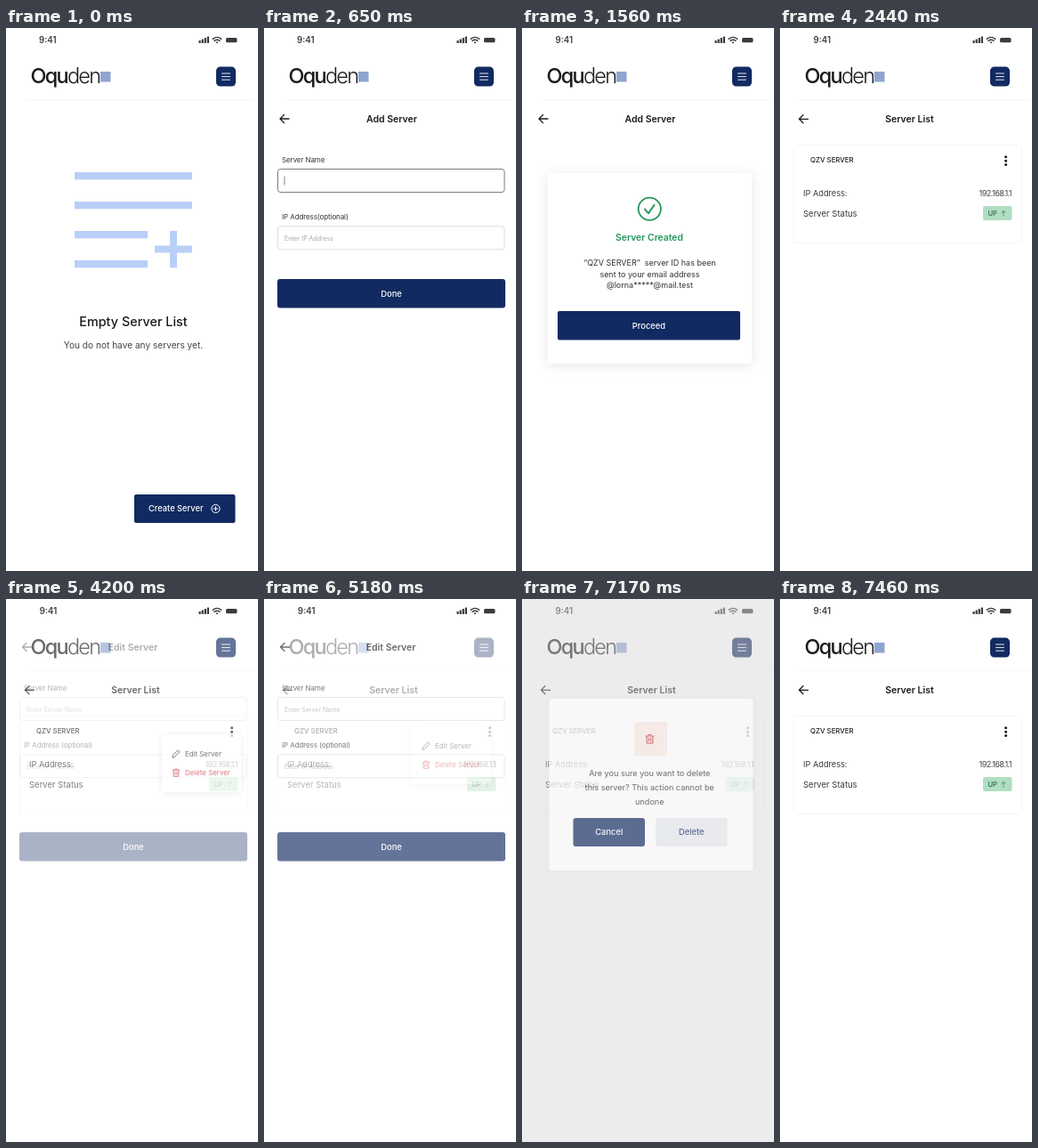
Write an HTML page that moves like this. It is 283x610 px and loops after 8000 ms.

```html
<!DOCTYPE html>
<html lang="en">
<head>
<meta charset="utf-8">
<title>Server list prototype</title>
<style>
  html, body { margin: 0; width: 100%; height: 100%; overflow: hidden; background: #fff; }
  svg { display: block; width: 283px; height: 610px; font-family: Inter, "Open Sans", sans-serif; }
  text { white-space: pre; }
</style>
</head>
<body>
<svg id="stage" viewBox="0 0 283 610"></svg>
<script>
const LOOP = 8000;
const NAVY = '#112a61', INK = '#1b1b1d', SOFT = '#3a3a3e', GREEN = '#22985a', RED = '#c8323c';

// y is the middle of the capitals
const text = (x, y, str, size, { fill = INK, weight = 400, anchor = 'start', gap = 0 } = {}) =>
  `<text x="${x}" y="${y + size * 0.364}" font-size="${size}" fill="${fill}" font-weight="${weight}" text-anchor="${anchor}" letter-spacing="${gap}">${str}</text>`;
const mid = (x, y, str, size, opts) => text(x, y, str, size, { anchor: 'middle', ...opts });
const rect = (x, y, w, h, fill, r = 0, extra = '') =>
  `<rect x="${x}" y="${y}" width="${w}" height="${h}" rx="${r}" fill="${fill}" ${extra}/>`;
const line = (d, stroke = INK, width = 1) =>
  `<path d="${d}" fill="none" stroke="${stroke}" stroke-width="${width}" stroke-linecap="round" stroke-linejoin="round"/>`;
const circle = (x, y, r, attrs) => `<circle cx="${x}" cy="${y}" r="${r}" ${attrs}/>`;
const shadow = (blur, alpha, dy = 0) => `style="filter:drop-shadow(0 ${dy}px ${blur}px rgba(0,0,0,${alpha}))"`;

const button = (x, y, w, h, label, fill = NAVY, color = '#fff', r = 3) =>
  rect(x, y, w, h, fill, r) + mid(x + w / 2, y + h / 2, label, 9.4, { fill: color, weight: 500 });
const back = (x, y) => line(`M${x + 10} ${y}H${x}m4.5 -4.5L${x} ${y}l4.5 4.5`, INK, 1.3);
const trash = (x, y, s) =>
  `<g transform="translate(${x} ${y}) scale(${s})">${line('M-4 -3H4M-1.5 -4.4H1.5M-3 -3V4.3H3V-3M-1 -0.8V2.2M1 -0.8V2.2', RED, 1)}</g>`;

function statusBar(x) {
  const bars = [3, 4.5, 6, 7.5].map((h, i) => rect(216.5 + i * 3.1, 17 - h, 2.2, h, '#3c3c3c', 0.5)).join('');
  const wifi = line('M232.2 12.4Q237 8.4 241.8 12.4M234 14.4Q237 12 240 14.4', '#3c3c3c', 1.4) +
    circle(237, 16.2, 1, 'fill="#3c3c3c"');
  return text(x, 13.5, '9:41', 9.7, { fill: '#3c3c3c', weight: 600 }) + bars + wifi +
    rect(247, 11, 12.5, 5.2, '#3c3c3c', 1.5);
}

function header(x = 37.5) {
  const brand = `<text x="27.5" y="61.5" font-size="23.5" fill="${INK}" letter-spacing="-1.75"><tspan font-weight="500">Oqu</tspan><tspan font-weight="300">den</tspan></text>`;
  return rect(0, 0, 283, 610, '#fff') + statusBar(x) + brand +
    rect(106, 49, 11.5, 11.5, '#8fa5cf') +
    rect(236, 43.6, 22, 22, NAVY, 4.5) +
    line('M242.5 51h9M242.5 54.6h9M242.5 58.2h9', '#fff', 0.9) +
    rect(22, 80, 258, 1, '#f6f6f7');
}

const title = (x, y, str) => mid(x, y, str, 10.5, { weight: 600 });

const field = (y, label, hint, border) =>
  text(20, y, label, 8, { fill: '#333', gap: -0.1 }) +
  rect(15.5, y + 10.5, 254.5, 26, '#fff', 3, `stroke="${border}" stroke-width="1"`) +
  text(23, y + 24, hint, 7, { fill: '#a9a9ad' });

const empty = header(37) +
  [[162, 132], [195, 132], [228, 82], [261, 82]].map(([y, w]) => rect(77, y, w, 8.3, '#b9cff7')).join('') +
  rect(167, 244.5, 42, 8, '#b9cff7') + rect(184, 228, 8, 41.3, '#b9cff7') +
  mid(143, 330, 'Empty Server List', 14.4, { weight: 500 }) +
  mid(143, 356, 'You do not have any servers yet.', 10.15, { fill: '#444' }) +
  rect(144, 524, 113.5, 32, NAVY, 2) +
  text(160, 540, 'Create Server', 9.3, { fill: '#fff', weight: 500 }) +
  circle(235.5, 540, 4.6, 'fill="none" stroke="#fff"') + line('M233.2 540h4.6M235.5 537.7v4.6', '#fff');

const add = header(37) + back(18, 102) + title(143.5, 102, 'Add Server') +
  field(148, 'Server Name', '', '#7b7b7f') + line('M23 167v9', '#666', 0.8) +
  field(212.3, 'IP Address(optional)', 'Enter IP Address', '#dcdce0') +
  button(15, 282, 256, 32.5, 'Done');

const created = header() + back(19, 102) + title(144, 102, 'Add Server') +
  rect(29, 163, 229, 214, '#fff', 2, shadow(7, 0.1, 2)) +
  circle(143.3, 203.2, 12.6, `fill="none" stroke="${GREEN}" stroke-width="1.8"`) +
  line('M138 203.6l4 4.6 6.6 -9.4', GREEN, 2) +
  mid(143, 235, 'Server Created', 10.4, { fill: GREEN, weight: 600 }) +
  ['“QZV SERVER”  server ID has been', 'sent to your email address', '@lorna*****@mail.test']
    .map((s, i) => mid(143.5, 264 + i * 12.6, s, 9, { fill: '#333' })).join('') +
  button(40, 318, 205, 32.5, 'Proceed', NAVY, '#fff', 2);

const list = header() + back(21.5, 102.3) + title(145.5, 102.3, 'Server List') +
  rect(15.5, 131.5, 256, 110, '#fff', 2, 'stroke="#f6f6f7"') +
  text(34, 148, 'QZV SERVER', 7.8, { weight: 500 }) +
  [144.8, 149.2, 153.6].map(y => circle(253.6, y, 1.5, `fill="${INK}"`)).join('') +
  text(26, 185.3, 'IP Address:', 9.2, { fill: SOFT }) +
  text(260, 185.3, '192.168.1.1', 9.2, { fill: '#4a4a4e', anchor: 'end', gap: -0.6 }) +
  text(26, 208.8, 'Server Status', 9.5, { fill: SOFT }) +
  rect(228, 200, 32.5, 16, '#b0dec2', 2) +
  text(233.5, 208.5, 'UP', 7.6, { fill: '#2f6648', weight: 500 }) +
  line('M251 211.4v-6m-2.1 2.1l2.1 -2.1l2.1 2.1', '#3f7657', 0.7);

const edit = rect(0, 0, 283, 610, '#fff') + statusBar(38) + back(18.5, 54) + title(142.5, 54, 'Edit Server') +
  field(100, 'Server Name', 'Enter Server Name', '#dcdce0') +
  field(164.3, 'IP Address (optional)', 'Enter IP Address', '#dcdce0') +
  button(15, 262, 256, 32.5, 'Done');

const menu = rect(175, 152, 89, 65, '#fff', 2, shadow(4, 0.12, 1)) +
  line('M187 177.8l0.5 -2.4l5.6 -5.6l1.9 1.9l-5.6 5.6z', '#333', 1) +
  text(201, 174, 'Edit Server', 7.9, { fill: '#333' }) +
  trash(191, 195.2, 0.95) + text(201, 195.2, 'Delete Server', 7.9, { fill: RED });

const modal = rect(30.5, 112, 229, 193, '#fff', 3, shadow(3, 0.06)) +
  rect(126, 138, 37, 38, '#fbe9e4', 3) + trash(143.5, 157.3, 1.1) +
  ['Are you sure you want to delete', 'this server? This action cannot be', 'undone']
    .map((s, i) => mid(143.3, 195.3 + i * 16, s, 9.1, { fill: '#2b2b2e' })).join('') +
  button(57.5, 246, 80.5, 32, 'Cancel') +
  button(150, 246, 80.5, 32, 'Delete', '#e7eaf0', NAVY);

// [markup, ...fades]; a fade is [start, end, steps, fade in?, sharpness]
const layers = [
  [empty],
  [add, [420, 650, 4, true]],
  [created, [1230, 1560, 5, true]],
  [list, [2140, 2440, 5, true]],
  [edit, [4200, 4470, 4, true], [5180, 5440, 4, false]],
  [menu, [3090, 3310, 4, true], [4200, 4470, 4, false]],
  [`<g transform="translate(-9 -9)">${menu}</g>`, [5180, 5440, 4, true], [6170, 6510, 5, false, 3]],
  [rect(0, 0, 283, 610, '#d9d9d9', 0, 'opacity=".75"'), [6170, 6510, 5, true], [7170, 7460, 5, false]],
  [modal, [6170, 6510, 5, true], [7170, 7460, 5, false]]
];

const stage = document.getElementById('stage');
stage.innerHTML = layers.map(([markup]) => `<g>${markup}</g>`).join('');
const groups = [...stage.children];

function opacityAt(t, fades) {
  if (!fades.length) return 1;
  let value = 0;
  for (const [start, end, steps, fadeIn, sharp = 1] of fades) {
    if (t < start) break;
    const k = Math.min(steps, 1 + Math.floor((t - start) / (end - start) * (steps - 1) + 1e-6));
    const left = Math.pow(1 - k / steps, 0.38 * steps * sharp);
    value = fadeIn ? 1 - left : left;
  }
  return value;
}

function draw() {
  const t = performance.now() % LOOP;
  layers.forEach(([, ...fades], i) => {
    const o = opacityAt(t, fades);
    groups[i].style.opacity = o;
    groups[i].style.display = o ? '' : 'none';
  });
  requestAnimationFrame(draw);
}
draw();
</script>
</body>
</html>
```
